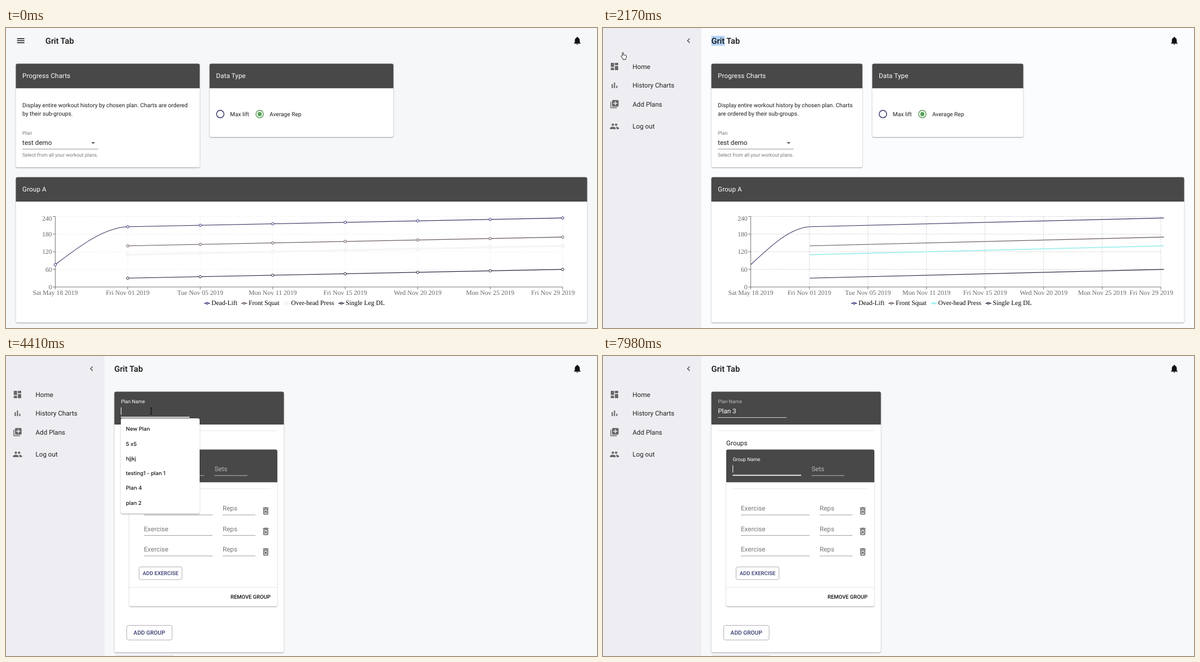
Write an HTML page with a canvas that moves like this. It is 1050x534 px and loops after 8000 ms.

```html
<!DOCTYPE html>
<html lang="en">
<head>
<meta charset="utf-8">
<title>Workout tracker</title>
<style>
html, body { margin: 0; width: 100%; height: 100%; overflow: hidden; background: #f6f7f9; }
canvas { display: block; width: 1050px; height: 534px; }
</style>
</head>
<body>
<canvas id="stage"></canvas>
<script>
const LOOP = 8000, W = 1050, H = 534;
const OPEN = 1750, NAV = 3345, LIST_OPEN = 4340, LIST_SHUT = 6650, TAB = 7600;
const BRAND = ['Grit', 'Tab'];
const SANS = 'Roboto, sans-serif', SERIF = '"Liberation Serif", serif', UI = 'Inter, sans-serif';
const DARK = '#484848', INK = '#1f1f1f';

const canvas = document.getElementById('stage');
const ctx = canvas.getContext('2d');
const dpr = window.devicePixelRatio || 1;
canvas.width = W * dpr;
canvas.height = H * dpr;
ctx.textRendering = 'geometricPrecision';

const ICONS = {
  menu: 'M3 18h18v-2H3v2zm0-5h18v-2H3v2zm0-7v2h18V6H3z',
  bell: 'M12 22c1.1 0 2-.9 2-2h-4c0 1.1.89 2 2 2zm6-6v-5c0-3.07-1.64-5.64-4.5-6.32V4c0-.83-.67-1.5-1.5-1.5s-1.5.67-1.5 1.5v.68C7.63 5.36 6 7.92 6 11v5l-2 2v1h16v-1l-2-2z',
  back: 'M15.41 7.41L14 6l-6 6 6 6 1.41-1.41L10.83 12z',
  home: 'M3 13h8V3H3v10zm0 8h8v-6H3v6zm10 0h8V11h-8v10zm0-18v6h8V3h-8z',
  bars: 'M5 9.2h3V19H5zM10.6 5h2.8v14h-2.8zM16.2 13H19v6h-2.8z',
  add: 'M4 6H2v14c0 1.1.9 2 2 2h14v-2H4V6zm16-4H8c-1.1 0-2 .9-2 2v12c0 1.1.9 2 2 2h12c1.1 0 2-.9 2-2V4c0-1.1-.9-2-2-2zm-1 9h-4v4h-2v-4H9V9h4V5h2v4h4v2z',
  people: 'M16 11c1.66 0 2.99-1.34 2.99-3S17.66 5 16 5c-1.66 0-3 1.34-3 3s1.34 3 3 3zm-8 0c1.66 0 2.99-1.34 2.99-3S9.66 5 8 5C6.34 5 5 6.34 5 8s1.34 3 3 3zm0 2c-2.33 0-7 1.17-7 3.5V19h14v-2.5c0-2.33-4.67-3.5-7-3.5zm8 0c-.29 0-.62.02-.97.05 1.16.84 1.97 1.97 1.97 3.45V19h6v-2.5c0-2.33-4.67-3.5-7-3.5z',
  trash: 'M14.12 10.47L12 12.59l-2.13-2.12-1.41 1.41L10.59 14l-2.12 2.12 1.41 1.41L12 15.41l2.12 2.12 1.41-1.41L13.41 14l2.12-2.12zM15.5 4l-1-1h-5l-1 1H5v2h14V4zM6 19c0 1.1.9 2 2 2h8c1.1 0 2-.9 2-2V7H6v12zM8 9h8v10H8V9z'
};
for (const k in ICONS) ICONS[k] = new Path2D(ICONS[k]);
const ARROW = new Path2D('M0 0V10.5L2.5 8.2 4.1 11.8 5.8 11 4.3 7.6H7.6z');
const HAND = new Path2D('M2.6 6.5V1.4a1 1 0 0 1 2 0V5q1.2-.8 1.8.2 1.3-.6 1.8.4 1.6-.4 1.6 1V9q0 1.5-1 2.4V13H4V12Q2 10 .6 7.6 .4 6.4 1.4 6.4 2 6.4 2.6 7z');

const clamp = v => Math.min(1, Math.max(0, v));
const lerp = (a, b, p) => a + (b - a) * p;
const ease = p => { p = clamp(p); return p * p * (3 - 2 * p); };

function setFont(o) {
  const size = o.size || 11.67;
  ctx.font = `${o.weight || 400} ${size}px ${o.family || SANS}`;
  ctx.letterSpacing = (o.gap || 0) * size + 'px';
}

function text(s, x, y, o = {}) {
  setFont(o);
  ctx.textAlign = o.align || 'left';
  ctx.fillStyle = o.color || INK;
  ctx.fillText(s, x, y);
  return ctx.measureText(s).width;
}

function rect(x, y, w, h, color) {
  ctx.fillStyle = color;
  ctx.fillRect(x, y, w, h);
}

function line(x1, y1, x2, y2, color, width = 1) {
  ctx.strokeStyle = color;
  ctx.lineWidth = width;
  ctx.beginPath();
  ctx.moveTo(x1, y1);
  ctx.lineTo(x2, y2);
  ctx.stroke();
}

function circle(x, y, r, fill, stroke, width = 1) {
  ctx.beginPath();
  ctx.arc(x, y, r, 0, 7);
  if (fill) { ctx.fillStyle = fill; ctx.fill(); }
  if (stroke) { ctx.strokeStyle = stroke; ctx.lineWidth = width; ctx.stroke(); }
}

function panel(x, y, w, h, head) {
  ctx.save();
  ctx.shadowColor = 'rgba(0,0,0,.38)';
  ctx.shadowBlur = 2 * dpr;
  ctx.shadowOffsetY = dpr;
  ctx.fillStyle = '#fff';
  ctx.beginPath();
  ctx.roundRect(x, y, w, h, 3);
  ctx.fill();
  ctx.restore();
  if (!head) return;
  ctx.fillStyle = DARK;
  ctx.beginPath();
  ctx.roundRect(x, y, w, head, [3, 3, 0, 0]);
  ctx.fill();
}

function icon(name, cx, cy, color) {
  ctx.save();
  ctx.translate(cx - 8.75, cy - 8.75);
  ctx.scale(17.5 / 24, 17.5 / 24);
  ctx.fillStyle = color;
  ctx.fill(ICONS[name]);
  ctx.restore();
}

const BODY = { size: 10.2 };

function wrapped(s, x, y, max) {
  setFont(BODY);
  let row = '';
  const rows = [];
  for (const word of s.split(' ')) {
    const next = row ? row + ' ' + word : word;
    if (ctx.measureText(next).width > max) { rows.push(row); row = word; } else row = next;
  }
  rows.push(row);
  rows.forEach((r, i) => text(r, x, y + i * 14.6, BODY));
}

// Chart
const DATES = ['Sat May 18', 'Fri Nov 01', 'Tue Nov 05', 'Mon Nov 11', 'Fri Nov 15', 'Wed Nov 20', 'Mon Nov 25', 'Fri Nov 29'];
const SERIES = [
  { name: 'Dead-Lift', base: 205, first: 76, color: '#30305e', dot: '#2b2b78', key: 352 },
  { name: 'Front Squat', base: 140, color: '#62535a', dot: '#5d4c54', key: 418 },
  { name: 'Over-head Press', base: 110, pale: true, key: 493.5 },
  { name: 'Single Leg DL', base: 30, color: '#20203a', dot: '#1c1c30', key: 590.5 }
];
const chartY = v => 461 - v * 125.5 / 240;

function series(s, left, width, opened, dots) {
  const step = width / 7;
  const at = i => [left + step * i, chartY(s.base + 5 * (i - 1))];
  const [x1, y1] = at(1);
  ctx.beginPath();
  if (s.first) {
    const y0 = chartY(s.first), slope = (at(2)[1] - y1) / step;
    const t0 = (3 * (y1 - y0) / step - 2 * slope) / 2, d = step / 3;
    ctx.moveTo(left, y0);
    ctx.bezierCurveTo(left + d, y0 + d * t0, x1 - d, y1 - d * 2 * slope, x1, y1);
  } else ctx.moveTo(x1, y1);
  ctx.lineTo(...at(7));
  ctx.strokeStyle = s.pale ? (opened ? '#a9f0f0' : '#f4f6f7') : s.color;
  ctx.lineWidth = s.pale ? (opened ? 2 : 3.5) : 1.1;
  ctx.stroke();
  if (!dots) return;
  if (s.first) circle(left, chartY(s.first), 2.2, '#fff', s.dot);
  for (let i = 1; i < 8; i++) {
    const [x, y] = at(i);
    if (s.pale) circle(x, y, 4, '#f3f5f6');
    else circle(x, y, 2.2, '#fff', s.dot);
  }
}

function chart(t, x0, k) {
  const left = x0 + 70, right = lerp(989, 991, k), step = (right - left) / 7, opened = t >= OPEN;
  ctx.setLineDash([2.2, 2.2]);
  const grid = opened ? '#c2c2c2' : '#ececec';
  for (let v = 60; v <= 240; v += 60) line(left, chartY(v), right, chartY(v), grid, .9);
  for (let i = 1; i < 8; i++) line(left + step * i, 335.5, left + step * i, 461, grid, .9);
  ctx.setLineDash([]);

  line(left, 335.5, left, 461, '#666', .9);
  line(left, 461, right, 461, '#666', .9);
  const tick = { family: SERIF, color: '#666' };
  for (let v = 0; v <= 240; v += 60) {
    line(left - 4.4, chartY(v), left, chartY(v), '#666', .9);
    text(v, left - 5.8, Math.max(chartY(v) + 4, 343), { ...tick, align: 'right' });
  }
  DATES.forEach((d, i) => {
    const x = left + step * i, last = i === 7;
    line(x, 461, x, 465.4, '#666', .9);
    text(d + ' 2019', last ? lerp(1010.5, 1013, k) : x, 475, { ...tick, align: last ? 'right' : 'center' });
  });

  const lineWidth = opened ? lerp(729, 901.5, Math.exp(-(t - OPEN) / 120)) : 901.5;
  ctx.save();
  ctx.beginPath();
  ctx.rect(x0, 310, 1016 - x0, 170);
  ctx.clip();
  for (const s of SERIES) series(s, left, lineWidth, opened, t < 1680);
  ctx.restore();

  const shift = 89 * k;
  for (const s of SERIES) {
    const x = s.key + shift, c = s.pale ? (opened ? '#a9f0f0' : '#f3f5f6') : s.dot;
    if (s.pale && !opened) circle(x + 5.3, 490, 4.5, c);
    line(x, 490, x + 10.4, 490, c, s.pale ? 2.5 : 1.4);
    circle(x + 5.2, 490, 1.7, s.pale ? c : '#fff', c, 1.2);
    text(s.name, x + 13, 493.3, { family: SERIF, color: '#000' });
  }
}

function historyPage(t, x0, k) {
  const col = (1032.5 - x0 + 17.5) / 3 - 17.5, x2 = x0 + col + 17.5, tx = x0 + 11.6;
  const head = { color: '#fff', gap: .0094 };
  panel(x0, 63.5, col, 184.5, 43.7);
  text('Progress Charts', tx, 89, head);
  wrapped('Display entire workout history by chosen plan. Charts are ordered by their sub-groups.', tx, 141, col - 23.3);
  text('Plan', tx, 189.5, { size: 8.75, color: '#777' });
  text('test demo', tx, 208);
  line(tx, 215.5, tx + 134.5, 215.5, '#8c8c8c', .9);
  ctx.fillStyle = '#707070';
  ctx.beginPath();
  ctx.moveTo(tx + 122, 203);
  ctx.lineTo(tx + 129.4, 203);
  ctx.lineTo(tx + 125.7, 206.8);
  ctx.fill();
  text('Select from all your workout plans.', tx, 229.3, { size: 8.75, color: '#777' });

  panel(x2, 63.5, col, 130.5, 43.7);
  text('Data Type', x2 + 11.6, 89, head);
  circle(x2 + 19, 153.2, 6.6, null, '#34346a', 1.45);
  text('Max lift', x2 + 36.4, 157, BODY);
  circle(x2 + 89, 153.2, 6.6, null, '#579b57', 1.45);
  circle(x2 + 89, 153.2, 3.7, '#55a455');
  text('Average Rep', x2 + 106.6, 157, BODY);

  panel(x0, 265.4, 1032.5 - x0, 258.8, 43.7);
  text('Group A', tx, 291, head);
  chart(t, x0, k);
}

// Plan form
const KEYS = [[5460, 'P'], [5600, 'l'], [5740, 'a'], [5880, 'n'], [6200, ' '], [6650, '3']];
const OPTIONS = ['New Plan', '5 x5', 'hjjkj', 'testing1 - plan 1', 'Plan 4', 'plan 2'];

function caret(t, since, x, y) {
  if (Math.floor((t - since) / 500) % 2 === 0) rect(x, y, 1, 13, '#fff');
}

function field(label, x, y, w, color, rule) {
  text(label, x, y, { color });
  line(x, y + 7.5, x + w, y + 7.5, rule, .9);
}

function button(label, x, y, w, h, size, tx, ty) {
  ctx.strokeStyle = '#a9a9b0';
  ctx.lineWidth = .9;
  ctx.beginPath();
  ctx.roundRect(x, y, w, h, 3);
  ctx.stroke();
  text(label, tx, ty, { size, weight: 500, color: '#363b70' });
}

function planPage(t) {
  const typed = KEYS.filter(k => t >= k[0]), value = typed.map(k => k[1]).join('');
  const p = ease((t - TAB) / 200), inPlan = t < TAB;
  panel(192.5, 63.5, 301.2, 464, 58.4);
  text('Plan Name', 204.2, 83.5, { size: 8.75, color: inPlan ? '#fff' : '#bcbcbc' });
  line(204, 109.5, 326, 109.5, '#e0e0e0', .9);
  if (p < 1) line(lerp(204, 265, p), 109, lerp(326, 265, p), 109, '#fff', 1.6);
  const w = text(value, 204.2, 102.3, { color: '#fff' });
  if (inPlan) {
    const since = typed.length ? typed[typed.length - 1][0] : t >= LIST_OPEN ? LIST_OPEN : 3100;
    caret(t, since, 204 + w, 91.5);
  }
  line(204, 133, 482, 133, '#e0e0e0', .8);
  text('Groups', 219, 159);

  panel(219, 166.5, 263, 279, 58.2);
  text('Group Name', 230.4, lerp(205.3, 186.5, p), { size: lerp(11.67, 8.75, p), color: p > 0 ? '#fff' : '#b8b8b8' });
  line(230.4, 212.8, 352, 212.8, '#c8c8c8', .9);
  if (p > 0) line(lerp(291, 230.4, p), 212.2, lerp(291, 352, p), 212.2, '#fff', 1.6);
  if (!inPlan) caret(t, TAB, 230.2, 194.5);
  field('Sets', 370.4, 205.3, 58.3, '#b8b8b8', '#c8c8c8');
  line(230.4, 236, 470.4, 236, '#e0e0e0', .8);
  for (let i = 0; i < 3; i++) {
    const y = 275.4 + 36.5 * i;
    field('Exercise', 245, y, 122, '#777', '#949494');
    field('Reps', 385, y, 58.3, '#777', '#949494');
    icon('trash', 461.5, y + .3, '#5c5c5c');
  }
  button('ADD EXERCISE', 236.4, 375.4, 76.4, 22.6, 9.48, 242.8, 389.8);
  line(219, 411.8, 482, 411.8, '#e0e0e0', .8);
  text('REMOVE GROUP', 399, 432, { size: 9.48, weight: 500, color: '#111' });
  button('ADD GROUP', 214.5, 479.5, 80.6, 26, 10.2, 226.6, 496.3);
  rect(194, 532.5, 104, 1.5, '#e6e6ea');

  if (t >= LIST_OPEN && t < LIST_SHUT) {
    const list = OPTIONS.filter(o => o.toLowerCase().startsWith(value.toLowerCase()));
    panel(204, 111, 140, list.length * 26.25 + 12, 0);
    list.forEach((o, i) => text(o, 213, 133.4 + 26.25 * i, { size: 9.5, weight: 500, family: UI, color: '#111' }));
  }
}

// Pointer path: time, x, y of the hot spot
const PATH = [[1050, 70, 110], [1330, 20, 27], [1750, 22, 29], [2170, 35.3, 43.5], [2560, 50, 92], [2980, 77.3, 137.6],
  [3340, 77.3, 137.6], [3600, 106.6, 137.6], [3700, 106.6, 137.6], [4150, 258, 98], [4700, 258, 98]];

function pointer(t) {
  const i = PATH.findIndex(p => p[0] > t);
  if (i < 1) return null;
  const a = PATH[i - 1], b = PATH[i], p = ease((t - a[0]) / (b[0] - a[0]));
  return { x: lerp(a[1], b[1], p), y: lerp(a[2], b[2], p) };
}

function drawPointer(t, pos) {
  if (!pos) return;
  const { x, y } = pos;
  if (t > 3950) {
    line(x, y - 5, x, y + 5, '#111', 1.2);
    line(x - 2, y - 5.5, x + 2, y - 5.5, '#111');
    line(x - 2, y + 5.5, x + 2, y + 5.5, '#111');
    return;
  }
  const hand = t > 1580;
  ctx.save();
  ctx.translate(x - (hand ? 3.6 : 0), y - (hand ? .4 : 0));
  ctx.lineJoin = 'round';
  ctx.lineWidth = hand ? 1 : 1.2;
  ctx.strokeStyle = hand ? '#222' : '#fff';
  ctx.fillStyle = hand ? '#fff' : '#000';
  const shape = hand ? HAND : ARROW;
  if (hand) { ctx.fill(shape); ctx.stroke(shape); } else { ctx.stroke(shape); ctx.fill(shape); }
  ctx.restore();
}

const MENU = [['home', 'Home', 68.5], ['bars', 'History Charts', 102], ['add', 'Add Plans', 135.5], ['people', 'Log out', 175]];

function drawer(k, pos) {
  if (k <= 0) return;
  ctx.save();
  ctx.beginPath();
  ctx.rect(0, 0, 175 * k, H);
  ctx.clip();
  rect(0, 0, 175, H, '#eeedf2');
  icon('back', 175 * k - 23, 22.5, '#555');
  for (const [name, label, y] of MENU) {
    if (pos && pos.x < 175 && Math.abs(pos.y + 4 - y) < 16.7) rect(0, y - 16.5, 175, 33.5, '#dcdbde');
    icon(name, 20.4, y, '#666');
    text(label, 52.5, y + 4);
  }
  ctx.restore();
}

function draw(t) {
  const k = ease((t - OPEN) / 225), x0 = lerp(17.5, 192.5, k), pos = pointer(t);
  ctx.setTransform(dpr, 0, 0, dpr, 0, 0);
  rect(0, 0, W, H, t < OPEN ? '#f6f7f9' : t < NAV ? '#fbfcfe' : '#f7f8fa');

  const title = { size: 14.6, weight: 500, color: '#111' };
  const tx = lerp(70, 192.5, k);
  if (t >= OPEN && t < NAV) {
    setFont(title);
    rect(tx, 14, ctx.measureText(BRAND[0]).width, 17.5, '#b4d3f7');
  }
  text(BRAND.join(' '), tx, 27.8, title);
  icon('bell', 1015, 22.7, '#111');
  if (t < OPEN) icon('menu', 26.2, 22.6, '#111');

  if (t < NAV) historyPage(t, x0, k); else planPage(t);
  drawer(k, pos);
  drawPointer(t, pos);
}

const start = performance.now();
function tick() {
  draw((performance.now() - start) % LOOP);
  requestAnimationFrame(tick);
}
tick();
</script>
</body>
</html>
```
